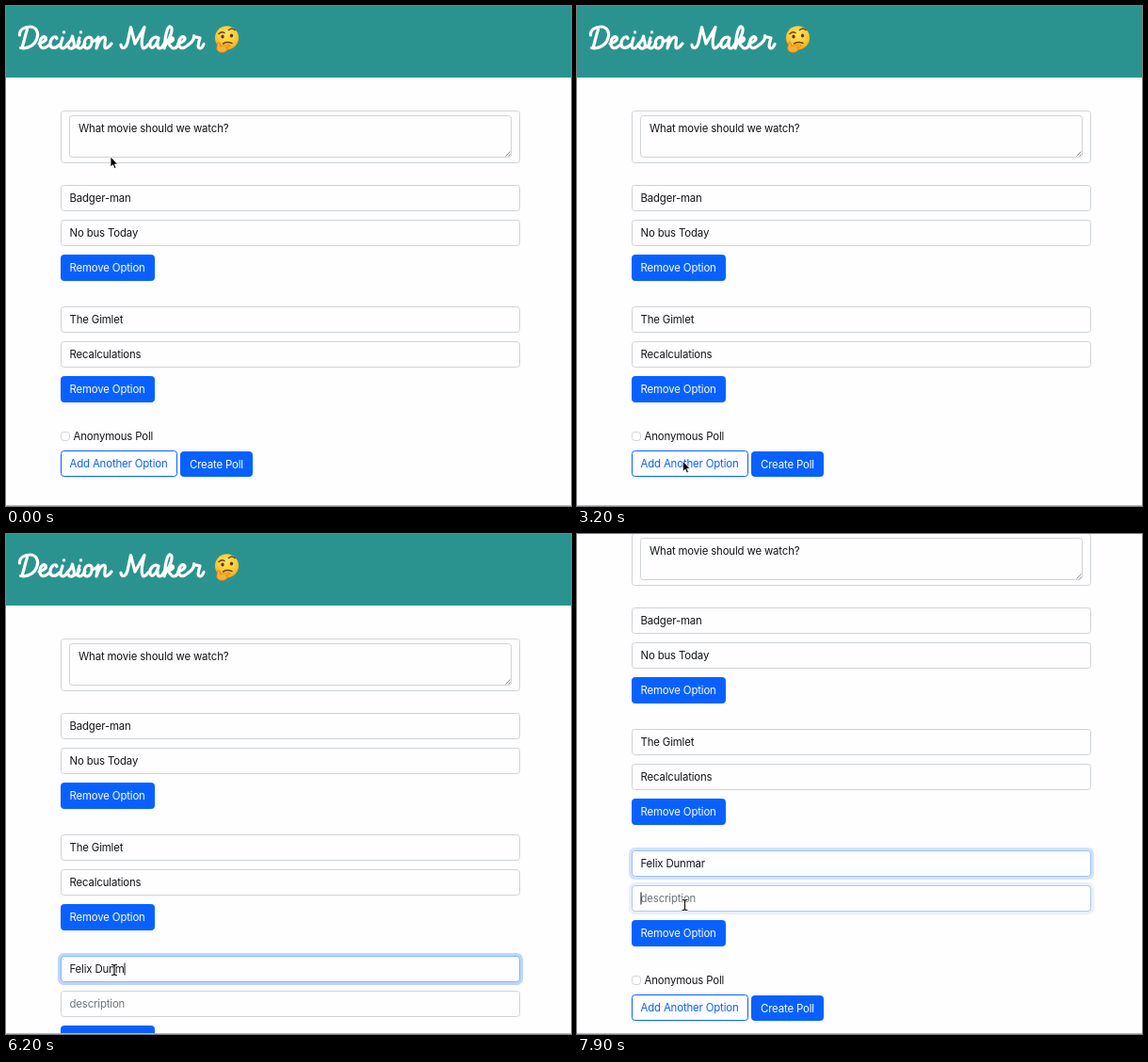
An HTML page that plays this animation: 600 by 531 pixels, repeating every 8000 ms.

```html
<!DOCTYPE html>
<html lang="en">
<head>
<meta charset="utf-8">
<title>Decision Maker</title>
<style>
  html, body { margin: 0; width: 100%; height: 100%; overflow: hidden; background: #fefdff; }
  svg { display: block; width: 600px; height: 531px; }
  text { font: 11.4px Inter, sans-serif; letter-spacing: -.15px; fill: #111416; white-space: pre; }
  .box { fill: #fefdff; stroke: #ced4da; }
  .button { fill: #0861ff; stroke: #0861ff; }
  .outline { fill: #fefdff; stroke: #0861ff; }
  .ring rect { fill: none; stroke: #86b7fe; }
  .ring .glow { stroke: #bdd5ff; stroke-width: 3; }
  .light { fill: #fff; }
  .blue { fill: #0861ff; }
  .hint { fill: #6c757d; }
  .script { fill: none; stroke: #fff; stroke-width: 3.2; stroke-linecap: round; stroke-linejoin: round; }
  .cursor { fill: #000; stroke: #fff; stroke-width: .8; }
</style>
</head>
<body>
<svg viewBox="0 0 600 531">
  <defs>
    <radialGradient id="face" cy=".35" r=".7">
      <stop offset="0" stop-color="#ffe45c"/><stop offset=".6" stop-color="#fcc938"/><stop offset="1" stop-color="#ee9a1c"/>
    </radialGradient>
    <path id="e" d="M35 40C40 39 44 35.5 42 33.5C40 31.5 36 34 36 39.5C36 45.5 41 46.5 46 41"/>
    <path id="i" d="M60 34C58 40 57 45 60 45C62 45 64 43 66 40M61.5 27.5V28"/>
  </defs>
  <g id="page"></g>
  <rect y="530" width="600" height="1" fill="#b9b9bd"/>
  <g id="pointer">
    <path id="arrow" class="cursor" d="M0 0V11L2.5 8.7L4.2 12.6L6 11.8L4.4 8H7.6Z"/>
    <g id="beam" fill="none" stroke-linecap="round">
      <path id="beamShape" stroke="#fff" stroke-width="2.4" d="M-2.5-5.5Q0-5.5 0-4V4Q0 5.5-2.5 5.5M2.5-5.5Q0-5.5 0-4M0 4Q0 5.5 2.5 5.5"/>
      <path stroke="#111" stroke-width="1.2" d="M-2.5-5.5Q0-5.5 0-4V4Q0 5.5-2.5 5.5M2.5-5.5Q0-5.5 0-4M0 4Q0 5.5 2.5 5.5"/>
    </g>
    <path id="hand" fill="#fff" stroke="#111" stroke-linejoin="round" d="M-2 1q1-2 2 0v4l5 1.2q1.4.5 1 2.2l-1 4.4h-5.5l-3.7-4.5q0-1.6 1.4-.8l.8.6zM1.5 8.5v2M3.5 8.5v2"/>
  </g>
</svg>
<script>
const $ = id => document.getElementById(id);
const LOOP = 8000, STEP = 100, GROUP = 129, TEXT_X = 67.5;
const NEW_TITLE = 'Felix Dunmar';

const box = (x, y, w, h, cls = 'box', id = '') =>
  `<rect id="${id}" class="${cls}" x="${x + .5}" y="${y + .5}" width="${w - 1}" height="${h - 1}" rx="3"/>`;
const label = (x, y, text, cls = '', id = '') =>
  `<text id="${id}" class="${cls}" x="${x}" y="${y}">${text}</text>`;

const field = (y, text, id, cls) => box(58, y, 488, 28) +
  `<g class="ring" id="${id}Ring" opacity="0">
     <rect class="glow" x="56.5" y="${y - 1.5}" width="491" height="31" rx="5"/>${box(58, y, 488, 28, '')}
   </g>` + label(TEXT_X, y + 18, text, cls, id + 'Text');

const option = (n, title, detail, cls) => {
  const y = 190 + n * GROUP;
  return `<g id="option${n}">` + field(y, title, 'title' + n, cls) + field(y + 37, detail, 'detail' + n, cls) +
    box(58, y + 74, 100, 28, 'button') + label(TEXT_X, y + 92, 'Remove Option', 'light') + '</g>';
};

const heading = `
  <rect width="600" height="76" fill="#2b938f"/>
  <g class="script" role="img" aria-label="Decision Maker">
    <path d="M22.5 25C20 32 19 39 17 44M14.5 31C14 25 20 22 25.5 22C32 22 35 28 33 34C31 41 24 46 15.5 44.5"/>
    <use href="#e"/>
    <path d="M54 34.5C53 31 48 33 47 39C46.5 45.5 52 46 57 41"/>
    <use href="#i"/>
    <path d="M65 41C68 38 70 35 70.5 32C71 37 74 41 71.5 44C69.5 46 66.5 45 66.5 43M72 44C75 44 76 42 78 38"/>
    <use href="#i" x="18"/>
    <path d="M90 33.5C85 32 83 37 83 41C83 46 88 46 90 42C92 38 92 34 89 33.5M91 37C93 38 95 37 97 35"/>
    <path d="M98 33L96 45C98 39 101 33 104 33C107 33 104 41 105 44C106 46 109 44 112 40"/>
    <path d="M122 41C122 46 127 46 129 39L132.5 22.5L137 40L147 22.5C145 30 143 40 145 44C146 46 149 44 151 41"/>
    <path d="M162 34C157 31 152 37 153 42C154 47 160 43 162 34C160 41 161 45 163 45C165 45 167 42 168 40"/>
    <path d="M170 39C175 34 178 23 174.5 22C171 21 169 33 168 45C170 38 174 33 177 34C179 36 175 39 171 39C174 40 175 45 178 45C180 45 182 43 183 41"/>
    <use href="#e" x="147.5"/>
    <path d="M194 41C198 38 200 34 199.5 31.5C200 34 205 33 206 34C204 40 203 45 206 45C208 45 209 43 210 40.5"/>
  </g>
  <circle cx="234.5" cy="33.8" r="12.6" fill="url(#face)"/>
  <g fill="none" stroke="#6b4218" stroke-linecap="round" stroke-width="1.5">
    <path d="M226 29.5Q229 26.5 232 28.5M236.5 25.5Q240 22.5 243 25.5M230.5 40Q235 37.5 240 39.5"/>
  </g>
  <g fill="#5a3510"><ellipse cx="230" cy="32.5" rx="1.6" ry="2.1"/><ellipse cx="239.5" cy="31.5" rx="1.6" ry="2.1"/></g>
  <path d="M225 39q1.5-1.5 2.3.5l.4 3 8.5-1.6q2.5 0 1.6 1.7l-4.5 1.6q3 .8 1.7 2.7q-3 3-7 2.4q-4.500-1-4.300-5z" fill="#fbb02d" stroke="#dc7c16" stroke-width=".7"/>`;

$('page').innerHTML = heading +
  box(58, 111, 488, 56) + box(67, 116, 470, 45) + label(77, 134, 'What movie should we watch?') +
  '<path d="M530.500 159.500l5-5M533.500 159.500l2-2" stroke="#777" stroke-width=".8"/>' +
  option(0, 'Badger-man', 'No bus Today') +
  option(1, 'The Gimlet', 'Recalculations') +
  option(2, 'Title', 'description', 'hint') +
  '<g id="footer">' + box(58, 452, 10, 10) + label(71.5, 461, 'Anonymous Poll') +
  box(58, 472, 124, 28, 'outline', 'add') + label(TEXT_X, 490, 'Add Another Option', 'blue', 'addText') +
  box(185, 473, 77, 27, 'button', 'create') + label(195, 490.5, 'Create Poll', 'light') + '</g>' +
  '<rect id="caret" width="1" height="13" fill="#111"/>';

// time, x, y, cursor shape from that time on
const moves = [
  [0, 111, 160, 'arrow'], [100, 111, 160, 'arrow'], [600, 128, 467, 'arrow'], [800, 128, 467, 'arrow'],
  [1000, 140, 484, 'hand'], [1300, 222, 487, 'hand'], [1600, 222, 487, 'arrow'], [1900, 150, 241, 'beam'],
  [2000, 150, 241, 'arrow'], [2300, 64, 460, 'arrow'], [2800, 64, 460, 'arrow'], [3300, 118, 486, 'hand'],
  [4000, 126, 500, 'hand'], [4600, 126, 500, 'beam'], [5000, 115, 463, 'beam'], [7100, 115, 463, 'beam'],
  [7600, 114.5, 394, 'beam'], [LOOP, 114.5, 394, 'beam']
];
const scrolls = [[0, 0], [6500, 0], [6600, 16], [6700, 46], [6800, 77], [6900, 98], [7000, 108], [7700, 112], [LOOP, 112]];

const clamp = v => Math.max(0, Math.min(1, v));
const smooth = v => v * v * (3 - 2 * v);
const linear = v => v;

function sample(keys, t, ease) {
  const n = keys.findIndex(k => k[0] > t), a = keys[n - 1], b = keys[n];
  const p = ease((t - a[0]) / (b[0] - a[0]));
  return [1, 2].map(c => a[c] + (b[c] - a[c]) * p).concat(a[3]);
}

// field, focus in, focus out, caret hidden, top of field
const focuses = [
  ['detail0', 1900, 2600, 2600, 227],
  ['title2', 5130, 7850, 6650, 448],
  ['detail2', 7850, 9000, 9000, 485]
];

function draw(t) {
  const added = t >= 4600, typed = NEW_TITLE.slice(0, Math.max(0, Math.floor((t - 5400) / 80)));
  $('option2').style.display = added ? '' : 'none';
  $('footer').setAttribute('transform', `translate(0 ${added ? GROUP : 0})`);
  $('title2Text').textContent = typed || 'Title';
  $('title2Text').setAttribute('class', typed ? '' : 'hint');

  $('caret').style.display = 'none';
  for (const [id, start, end, hide, y] of focuses) {
    $(id + 'Ring').setAttribute('opacity', clamp((t - start) / 150) - clamp((t - end) / 150));
    if (t < start || t >= hide) continue;
    const text = $(id + 'Text');
    const width = text.classList.contains('hint') ? 0 : text.getComputedTextLength();
    $('caret').style.display = '';
    $('caret').setAttribute('x', TEXT_X + width);
    $('caret').setAttribute('y', y + 7.5);
  }

  const [x, y, shape] = sample(moves, t, smooth);
  $('pointer').setAttribute('transform', `translate(${x} ${y})`);
  for (const id of ['arrow', 'beam', 'hand']) $(id).style.display = id === shape ? '' : 'none';
  const onAdd = shape === 'hand' && x < 184, onCreate = shape === 'hand' && x >= 184;
  $('add').setAttribute('class', onAdd ? 'button' : 'outline');
  $('addText').setAttribute('class', onAdd ? 'light' : 'blue');
  $('create').style.fill = $('create').style.stroke = onCreate ? '#0a57d8' : '';

  $('page').setAttribute('transform', `translate(0 ${-sample(scrolls, t, linear)[0]})`);
}

const begin = performance.now();
function tick() {
  draw(Math.floor((performance.now() - begin) % LOOP / STEP) * STEP);
  requestAnimationFrame(tick);
}
tick();
</script>
</body>
</html>
```
